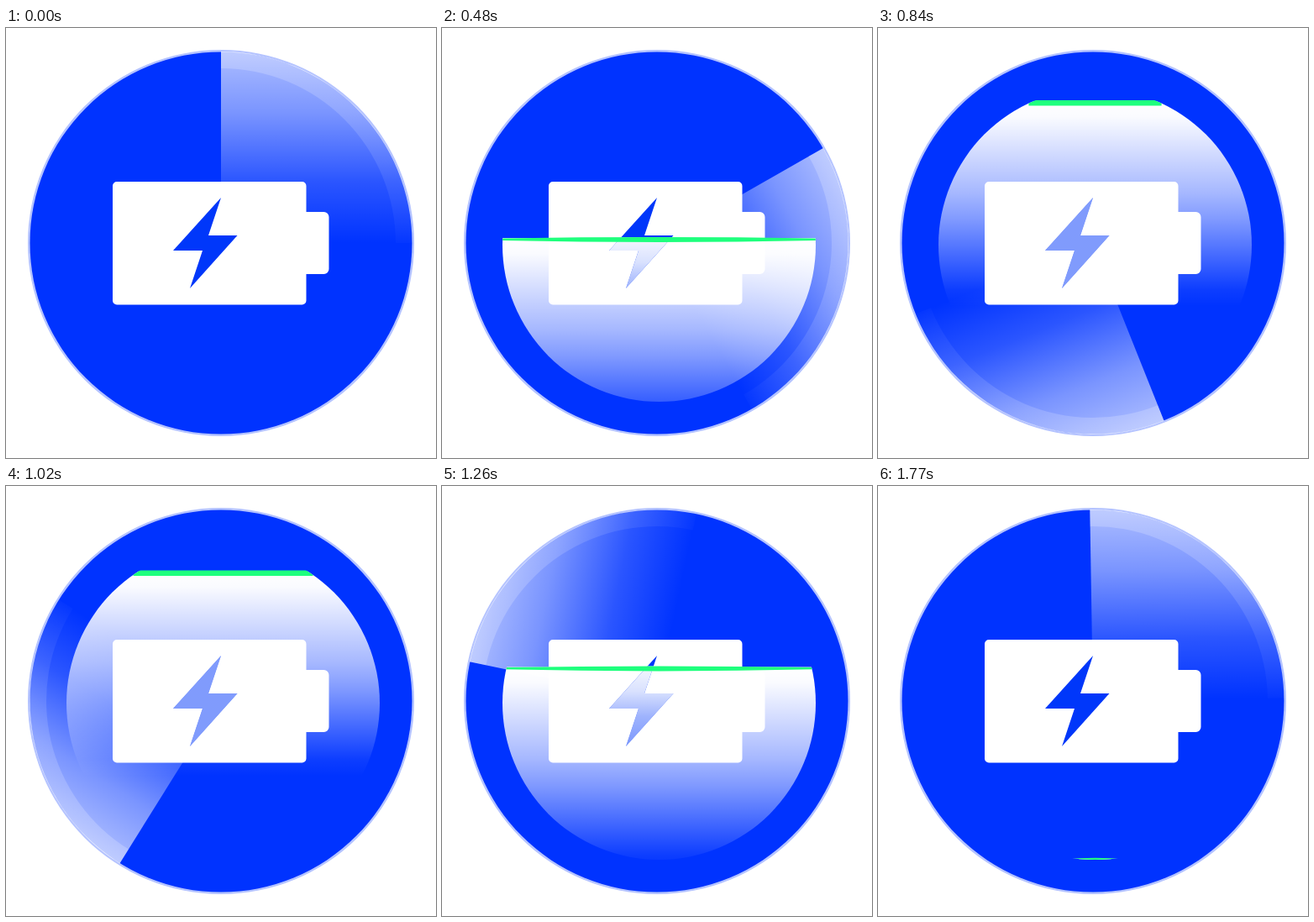
An HTML page with a canvas for the animation above (1.8 s loop, 512x512 px).

```html
<!DOCTYPE html>
<html lang="en">
<head>
<meta charset="utf-8">
<title>Battery charging</title>
<style>
html, body { margin: 0; width: 100%; height: 100%; overflow: hidden; background: #fff; }
canvas { display: block; width: 100vmin; height: 100vmin; }
</style>
</head>
<body>
<canvas id="stage" width="512" height="512"></canvas>
<script>
const ctx = document.getElementById('stage').getContext('2d');
const LOOP = 1800, TICK = 30, STEP = 36, STEPS = LOOP / STEP;
const BLUE = '#0033ff', GREEN = '#1eff7d';
const disc = { x: 256, y: 256, r: 230 };
const tank = { x: 258.5, y: 258.5, r: 186.5 };

const clamp = v => Math.min(1, Math.max(0, v));
const smooth = v => v * v * (3 - 2 * v);
const white = a => `rgba(255,255,255,${a})`;

function circle(c, r = c.r) {
  ctx.beginPath();
  ctx.arc(c.x, c.y, r, 0, Math.PI * 2);
}

function fade(y0, y1, stops) {
  const g = ctx.createLinearGradient(0, y0, 0, y1);
  for (const [at, alpha] of stops) g.addColorStop(at, white(alpha));
  return g;
}

function drawDisc() {
  circle(disc);
  ctx.fillStyle = '#b4c3ff';
  ctx.fill();
  circle(disc, 227.5);
  ctx.fillStyle = BLUE;
  ctx.fill();
}

// Quarter sector, brightest at the rim next to its leading edge
function drawSweep(angle) {
  const sector = (r, inner) => {
    ctx.beginPath();
    ctx.arc(0, 0, r, -Math.PI / 2, 0);
    if (inner) ctx.arc(0, 0, inner, 0, -Math.PI / 2, true);
    else ctx.lineTo(0, 0);
    ctx.closePath();
    ctx.fill();
  };
  ctx.save();
  ctx.translate(disc.x, disc.y);
  ctx.rotate(angle);
  ctx.fillStyle = fade(-228, 0, [[0, 0.68], [0.32, 0.48], [0.68, 0.17], [1, 0]]);
  sector(228);
  ctx.fillStyle = fade(-228, 0, [[0, 0.22], [1, 0.02]]);
  sector(228, 208);
  ctx.restore();
}

function drawFill(level) {
  ctx.save();
  circle(tank);
  ctx.clip();
  ctx.fillStyle = fade(level, level + 245,
    [[0, 1], [0.08, 0.98], [0.45, 0.65], [0.58, 0.5], [0.92, 0.05], [1, 0]]);
  ctx.fillRect(60, level + 1, 400, 400);
  ctx.restore();
}

function boltPath() {
  ctx.beginPath();
  ctx.moveTo(256, 202);
  ctx.lineTo(241, 247);
  ctx.lineTo(275.5, 247);
  ctx.lineTo(219, 310);
  ctx.lineTo(234, 265);
  ctx.lineTo(199, 265);
  ctx.closePath();
}

function drawBattery(level) {
  ctx.fillStyle = '#fff';
  ctx.beginPath();
  ctx.roundRect(127, 183, 230.5, 146.5, 5);
  ctx.roundRect(350, 219, 34.5, 74, 6);
  ctx.fill();
  boltPath();
  ctx.fillStyle = '#0037fa';
  ctx.fill();
  // The part of the bolt below the surface looks paler
  ctx.save();
  ctx.clip();
  ctx.fillStyle = fade(level, level + 100, [[0, 0.96], [0.3, 0.85], [0.6, 0.62], [0.9, 0.5], [1, 0.5]]);
  ctx.fillRect(190, level, 100, 400);
  ctx.restore();
}

function drawSurface(level) {
  const dy = level - tank.y;
  if (Math.abs(dy) >= tank.r) return;
  const half = Math.sqrt(tank.r ** 2 - dy ** 2) + 8;
  const left = tank.x - half, right = tank.x + half;
  const taper = clamp((level - 165) / 45);
  const top = level + 1.6 * taper, bottom = level + 6.5 - 2.8 * taper;
  ctx.save();
  circle(tank);
  ctx.clip();
  ctx.beginPath();
  ctx.moveTo(left, top);
  ctx.quadraticCurveTo(tank.x, level - 1.6 * taper, right, top);
  ctx.lineTo(right, bottom);
  ctx.quadraticCurveTo(tank.x, level + 6.5 + 1.6 * taper, left, bottom);
  ctx.closePath();
  ctx.fillStyle = GREEN;
  ctx.fill();
  ctx.restore();
}

function draw(ms) {
  const tick = Math.floor((ms % LOOP) / TICK) * TICK;
  const step = Math.floor(tick / STEP);
  const angle = smooth(step / STEPS) * 359.5 * Math.PI / 180;
  const level = 52.5 + 16.3 * Math.abs(step - 25.06);

  ctx.fillStyle = '#fff';
  ctx.fillRect(0, 0, 512, 512);
  drawDisc();
  drawSweep(angle);
  drawFill(level);
  drawBattery(level);
  drawSurface(level);
}

const start = performance.now();
function loop() {
  draw(performance.now() - start);
  requestAnimationFrame(loop);
}
loop();
</script>
</body>
</html>
```
